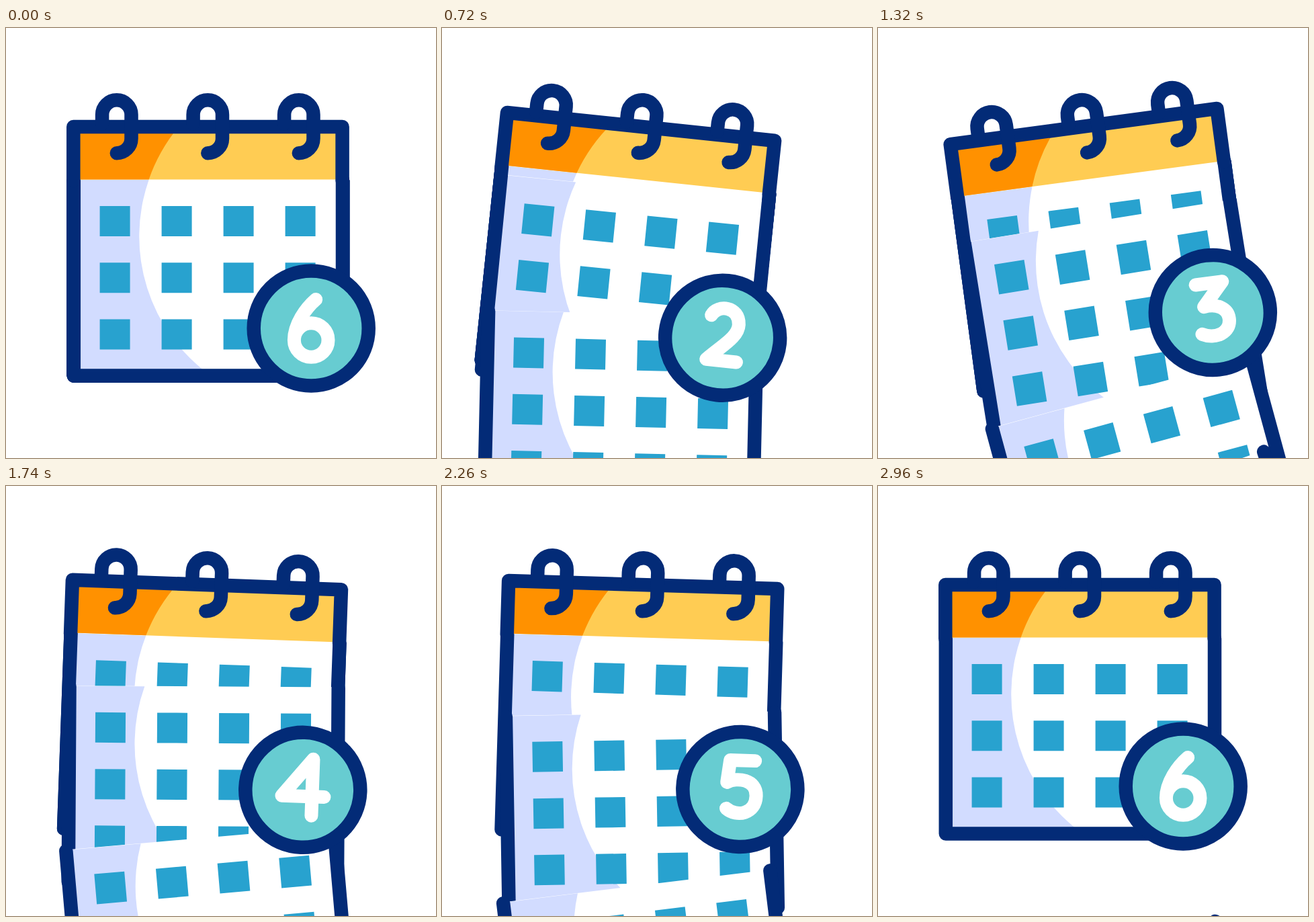
Recreate the animation shown at these times as an HTML page. Size 640x640 px, loop 3.6 s.

```html
<!DOCTYPE html>
<html lang="en">
<head>
<meta charset="utf-8">
<title>Calendar</title>
<style>
  html, body { margin: 0; width: 100%; height: 100%; overflow: hidden; background: #fff; }
  svg { display: block; width: 100vw; height: 100vh; }
  .line { fill: none; stroke: #032b77; stroke-width: 20.5; stroke-linecap: round; stroke-linejoin: round; }
  .days { fill: none; stroke: #28a2cf; stroke-width: 45; stroke-dasharray: 45 47; }
  .digit { fill: none; stroke: #fff; stroke-width: 20; stroke-linecap: round; stroke-linejoin: round; }
</style>
</head>
<body>
<svg viewBox="0 0 640 640">
  <defs>
    <g id="page">
      <path fill="#fff" d="M101 225.5H501V517.5H101Z"/>
      <path fill="#d2dcff" d="M101 225.9H212.6A255 255 0 0 0 304.8 517.5H101Z"/>
      <path class="days" d="M139.6 287.5H461M139.6 371.8H461M139.6 456H461"/>
      <path class="line" d="M100.8 227V517.5H501V227"/>
    </g>
    <path id="ring" class="line" d="M-21.7 142V129A21.7 21.7 0 0 1 21.7 129V164.5A21.7 21.7 0 0 1 0 186.2"/>
  </defs>
  <g id="calendar">
    <use href="#page"/>
    <g id="pages"></g>
    <path fill="#ffcc53" d="M101 147H500V225.5H101Z"/>
    <path fill="#ff9100" d="M101 147H256.9A255 255 0 0 0 212.6 225.5H101Z"/>
    <path class="line" d="M100.3 227V147H500.6V227"/>
    <use href="#ring" x="164.8"/>
    <use href="#ring" x="300.3"/>
    <use href="#ring" x="435.8"/>
    <g transform="translate(454.2 447)">
      <circle r="85.5" fill="#67ccd1" stroke="#032b77" stroke-width="20.5"/>
      <path id="digit" class="digit"/>
    </g>
  </g>
</svg>
<script>
const LOOP = 3600, REST = 2960;

// Swing: [time, degrees]
const swing = [[0, 0], [490, 9.8], [1245, -8], [1950, 4.6], [2485, 0]];

// Falling pages: [start, duration]
const falls = [[168, 1235], [596, 1187], [1029, 1229], [1431, 1216], [1845, 1288]];
const DROP = 480, TILT = -11.28;

const digits = [
  'M7 -43C-8 -30 -25.3 -6 -25.3 17.5A25.3 25.3 0 1 0 25.3 17.5A25.3 25.3 0 1 0 -25.3 17.5',
  'M-9.5 -29L12.8 -43V37',
  'M-20 -32C-13 -49 20 -50 22 -22C23 -4 2 10 -21 34H24',
  'M-20 -44H20L-12 -10C8 -13 23 -3 23 12C23 34 -2 40 -20 30',
  'M14 38V-46L-31 9.5H32',
  'M21 -43H-16L-20 -10C-6 -18 24 -16 24 9C24 36 -4 42 -20 29'
];
const digitTimes = [208, 636, 1069, 1471, 1885, 2300];

const byId = id => document.getElementById(id);
const calendar = byId('calendar'), digit = byId('digit');

// Earlier pages lie on top of later ones.
const pages = falls.map(() => {
  const page = document.createElementNS('http://www.w3.org/2000/svg', 'use');
  page.setAttribute('href', '#page');
  byId('pages').prepend(page);
  return page;
});

const ease = p => (1 - Math.cos(Math.PI * Math.min(1, Math.max(0, p)))) / 2;

function angleAt(t) {
  let angle = 0;
  for (let i = 1; i < swing.length; i++) {
    const [t0, a0] = swing[i - 1], [t1, a1] = swing[i];
    angle += (a1 - a0) * ease((t - t0) / (t1 - t0));
  }
  return angle;
}

function draw(t) {
  calendar.setAttribute('transform', `rotate(${angleAt(t)} 300 105)`);
  falls.forEach(([start, span], i) => {
    const k = ease((t - start) / span);
    pages[i].setAttribute('transform', `translate(0 ${DROP * k}) rotate(${TILT * k} 300 203)`);
  });
  const count = digitTimes.filter(time => t >= time).length;
  digit.setAttribute('d', digits[count % 6]);
}

const begin = performance.now();
function tick() {
  draw(Math.min((performance.now() - begin) % LOOP, REST));
  requestAnimationFrame(tick);
}
tick();
</script>
</body>
</html>
```
